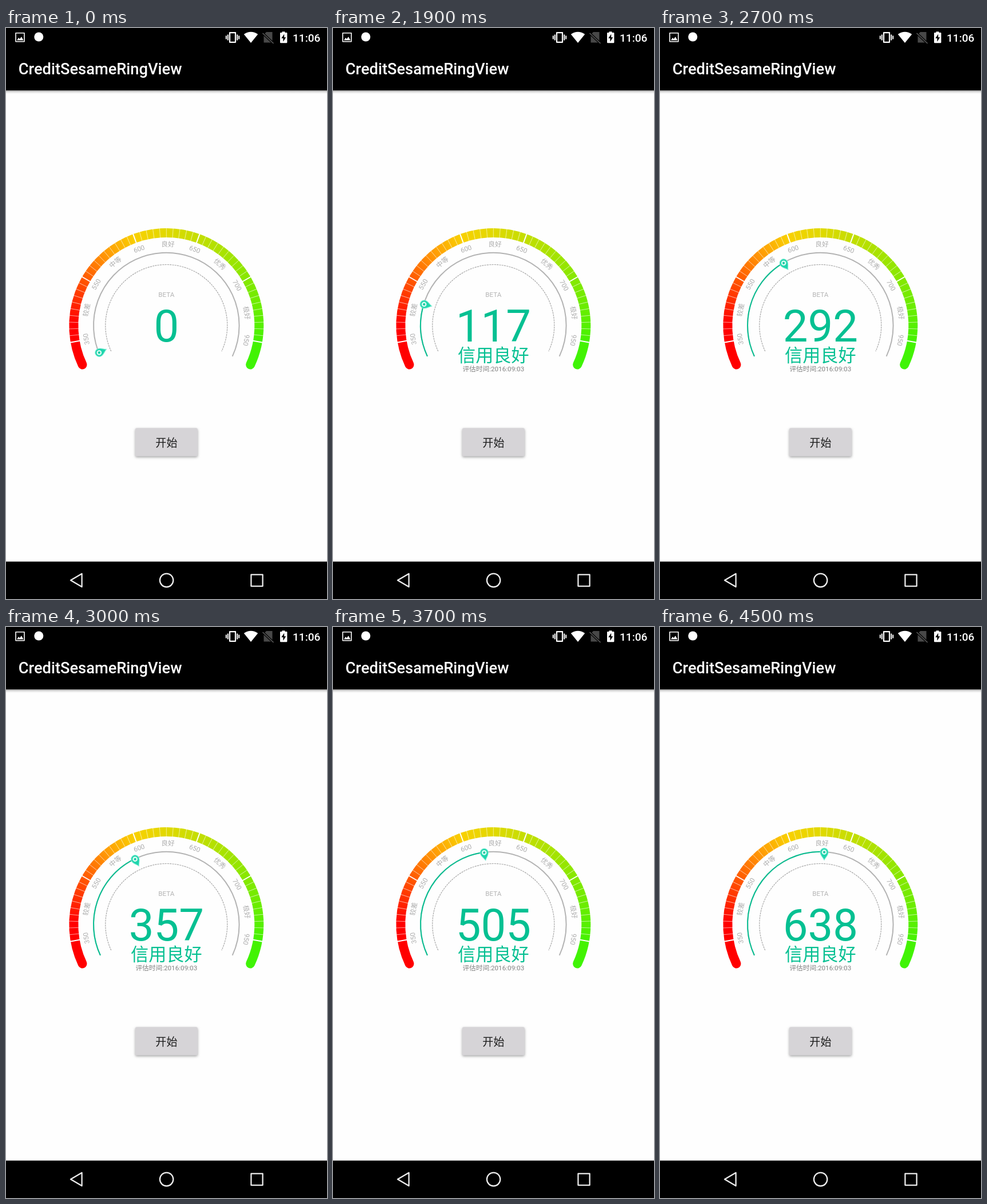
Write an HTML page with a canvas that moves like this. It is 561 px wide and 998 px high and loops after 4.6 s.

```html
<!DOCTYPE html>
<html lang="zh-CN">
<head>
<meta charset="utf-8">
<title>CreditSesameRingView</title>
<style>
html, body { margin: 0; width: 100%; height: 100%; overflow: hidden; background: #fefefe; }
canvas { display: block; width: 561px; height: 998px; }
</style>
</head>
<body>
<canvas id="stage" lang="zh-CN"></canvas>
<script>
const W = 561, H = 998, LOOP = 4600, STEP = 100, PRESS = 1400;
const CX = 280.3, CY = 520, FROM = 155, SWEEP = 230, SCORE = 638;
const GREEN = '#05c092', GRAY = '#b3b3b3';
const FONT = 'Roboto, "Noto Sans CJK SC", "Noto Sans CJK", sans-serif';
const canvas = document.getElementById('stage');
const dpr = window.devicePixelRatio || 1;
canvas.width = W * dpr;
canvas.height = H * dpr;
const c = canvas.getContext('2d');
const rad = d => d * Math.PI / 180;

// score reached at given times
const KEYS = [[1400, 14], [1900, 117], [2700, 292], [3300, 421], [4100, 589], [4333, SCORE]];

function scoreAt(t) {
  if (t < PRESS) return 0;
  for (let i = 1; i < KEYS.length; i++) {
    const [t0, v0] = KEYS[i - 1], [t1, v1] = KEYS[i];
    if (t <= t1) return v0 + (v1 - v0) * (t - t0) / (t1 - t0);
  }
  return SCORE;
}

function bounce(x) {
  x *= 1.1226;
  if (x < 0.3535) return 8 * x * x;
  if (x < 0.7408) return 8 * (x - 0.54719) ** 2 + 0.7;
  if (x < 0.9644) return 8 * (x - 0.8526) ** 2 + 0.9;
  return 8 * (x - 1.0435) ** 2 + 0.95;
}

function text(s, x, y, size, color, align = 'center', weight = 400) {
  c.font = `${weight} ${size}px ${FONT}`;
  c.textAlign = align;
  c.fillStyle = color;
  c.fillText(s, x, y);
}

function arc(r, from, sweep, color, width) {
  c.beginPath();
  c.arc(CX, CY, r, rad(from), rad(from + sweep));
  c.strokeStyle = color;
  c.lineWidth = width;
  c.stroke();
}

function poly(points, close = true) {
  c.beginPath();
  points.forEach(([x, y]) => c.lineTo(x, y));
  if (close) c.closePath();
}

function disc(x, y, r, color) {
  c.beginPath();
  c.arc(x, y, r, 0, 7);
  c.fillStyle = color;
  c.fill();
}

// run draw() with "up" pointing along the given angle
function turned(angle, draw) {
  c.save();
  c.translate(CX, CY);
  c.rotate(rad(angle - 270));
  draw();
  c.restore();
}

const ring = c.createConicGradient(rad(90), CX, CY);
[[155, '#ff0000'], [181, '#ff0000'], [210, '#ff5a00'], [230, '#ff9a06'], [250, '#f9d000'],
 [270, '#e1d900'], [290, '#c4de00'], [310, '#a6e300'], [330, '#86e800'], [350, '#68ed00'],
 [370, '#45f200'], [386, '#3ff407']].forEach(([a, col]) => ring.addColorStop((a - 90) / 360, col));

function drawStatusBar() {
  c.fillStyle = '#000';
  c.fillRect(0, 0, W, 109);
  const shade = c.createLinearGradient(0, 109, 0, 115);
  shade.addColorStop(0, 'rgba(0,0,0,.38)');
  shade.addColorStop(0.5, 'rgba(0,0,0,.1)');
  shade.addColorStop(1, 'rgba(0,0,0,0)');
  c.fillStyle = shade;
  c.fillRect(0, 109, W, 6);
  text('CreditSesameRingView', 21.8, 81, 27.27, '#fff', 'left', 500);
  text('11:06', 501, 23.8, 19.1, '#fff', 'left', 500);

  // picture
  c.strokeStyle = c.fillStyle = '#fff';
  c.lineWidth = 1.6;
  c.strokeRect(17, 8.8, 15, 15);
  poly([[19, 21.5], [22, 17], [24, 19.3], [27, 15.2], [30.5, 21.5]]);
  c.fill();
  disc(57.3, 15.5, 8, '#fff');

  // vibrate
  c.strokeStyle = '#fff';
  c.lineWidth = 2.2;
  c.strokeRect(391, 8.2, 10, 16.6);
  c.fillRect(386.8, 11.5, 2, 10);
  c.fillRect(383.8, 13.5, 2, 6);
  c.fillRect(403.2, 11.5, 2, 10);
  c.fillRect(406.2, 13.5, 2, 6);

  // wifi
  c.beginPath();
  c.moveTo(428, 26);
  c.lineTo(415.8, 11);
  c.quadraticCurveTo(428, 2.6, 440.2, 11);
  c.closePath();
  c.fill();

  // no sim
  poly([[455, 7], [465.5, 7], [465.5, 25.5], [450.5, 25.5], [450.5, 11.5]]);
  c.fillStyle = '#484848';
  c.fill();
  poly([[448.5, 9], [467.5, 27]], false);
  c.strokeStyle = '#000';
  c.lineWidth = 4;
  c.stroke();
  c.strokeStyle = '#585858';
  c.lineWidth = 1.7;
  c.stroke();

  // battery
  c.fillStyle = '#fff';
  c.fillRect(482.5, 6.3, 5, 3);
  c.beginPath();
  c.roundRect(479, 8, 12.4, 18.2, 1.2);
  c.fill();
  poly([[486.2, 10.5], [481.3, 18], [484.4, 18], [484.4, 24], [489.3, 16.2], [486.2, 16.2]]);
  c.fillStyle = '#000';
  c.fill();
}

function drawNavBar() {
  c.fillStyle = '#000';
  c.fillRect(0, 932.6, W, H - 932.6);
  c.strokeStyle = '#ececec';
  c.lineWidth = 2.3;
  c.lineJoin = 'round';
  poly([[113, 965.3], [132.6, 953.8], [132.6, 976.8]]);
  c.stroke();
  c.beginPath();
  c.arc(280.6, 965.3, 11.7, 0, 7);
  c.stroke();
  c.strokeRect(428.4, 955.4, 20.2, 20.2);
}

function drawButton(t) {
  const box = () => { c.beginPath(); c.roundRect(226, 699.2, 108.8, 49.4, 2.5); };
  const age = t - PRESS;
  const pressed = age >= 0 && age < 400;
  const fade = pressed ? 1 - age / 400 : 0;
  c.save();
  c.shadowColor = `rgba(0,0,0,${pressed ? 0.42 : 0.36})`;
  c.shadowBlur = 4 * dpr;
  c.shadowOffsetY = 1.7 * dpr;
  box();
  c.fillStyle = '#d6d4d7';
  c.fill();
  c.restore();
  if (pressed) {
    c.save();
    box();
    c.clip();
    c.fillStyle = `rgba(0,0,0,${0.03 * fade})`;
    c.fillRect(226, 699, 109, 50);
    disc(273, 737, 41 + age * 0.09, `rgba(0,0,0,${0.055 * fade})`);
    c.restore();
  }
  text('开始', 280.4, 731.6, 19.1, '#1c1c1c');
}

function drawPin() {
  const x = 6.7, y = -126.5;
  c.beginPath();
  c.moveTo(x, y + 14);
  c.bezierCurveTo(x - 2, y + 9, x - 7, y + 6, x - 7, y);
  c.arc(x, y, 7, Math.PI, 0);
  c.bezierCurveTo(x + 7, y + 6, x + 2, y + 9, x, y + 14);
  c.closePath();
  c.fillStyle = '#1fd5ad';
  c.fill();
  c.strokeStyle = 'rgba(130,238,214,.75)';
  c.lineWidth = 1.3;
  c.stroke();
  disc(x, y, 4.4, '#d9fbf2');
  disc(x, y, 2, '#13c9a0');
}

function drawGauge(t) {
  c.lineCap = 'round';
  arc(162, FROM, SWEEP, ring, 16);
  c.lineCap = 'butt';
  for (let i = 0; i <= 50; i++) {
    const big = i % 10 === 0;
    turned(170 + i * 4, () => {
      poly([[0, -153], [0, -171]], false);
      c.strokeStyle = big ? '#fff' : 'rgba(255,255,255,.72)';
      c.lineWidth = big ? 2 : 0.8;
      c.stroke();
    });
  }
  ['350', '较差', '550', '中等', '600', '良好', '650', '优秀', '700', '极好', '950'].forEach((s, i) => {
    const shift = i % 2 ? 1.1 : 0.4;
    turned(170 + i * 20 + shift, () => text(s, 0, -138, 11.69, '#adadad'));
  });

  arc(127.3, FROM, SWEEP, GRAY, 2);
  c.setLineDash([3.1, 1.2]);
  arc(106.5, FROM, SWEEP, '#a9a9a9', 1.2);
  c.setLineDash([]);

  const score = scoreAt(t);
  const swept = bounce(score / SCORE) * SWEEP / 2;
  if (swept > 0) arc(127.3, FROM, swept, GREEN, 2);
  turned(FROM + swept, drawPin);

  text('BETA', CX, 470, 11.69, '#b4b4b4');
  text(String(Math.round(score)), CX, 548, 77.9, GREEN);
  if (t >= PRESS) {
    text('信用良好', CX, 582.8, 31.17, GREEN);
    text('评估时间:2016:09:03', CX, 600.3, 11.69, '#808080');
  }
}

function frame(now) {
  const t = Math.floor((now % LOOP) / STEP) * STEP;
  c.setTransform(dpr, 0, 0, dpr, 0, 0);
  c.fillStyle = '#fefefe';
  c.fillRect(0, 0, W, H);
  drawStatusBar();
  drawGauge(t);
  drawButton(t);
  drawNavBar();
}

const start = performance.now();
function tick() {
  frame(performance.now() - start);
  requestAnimationFrame(tick);
}
tick();
</script>
</body>
</html>
```
